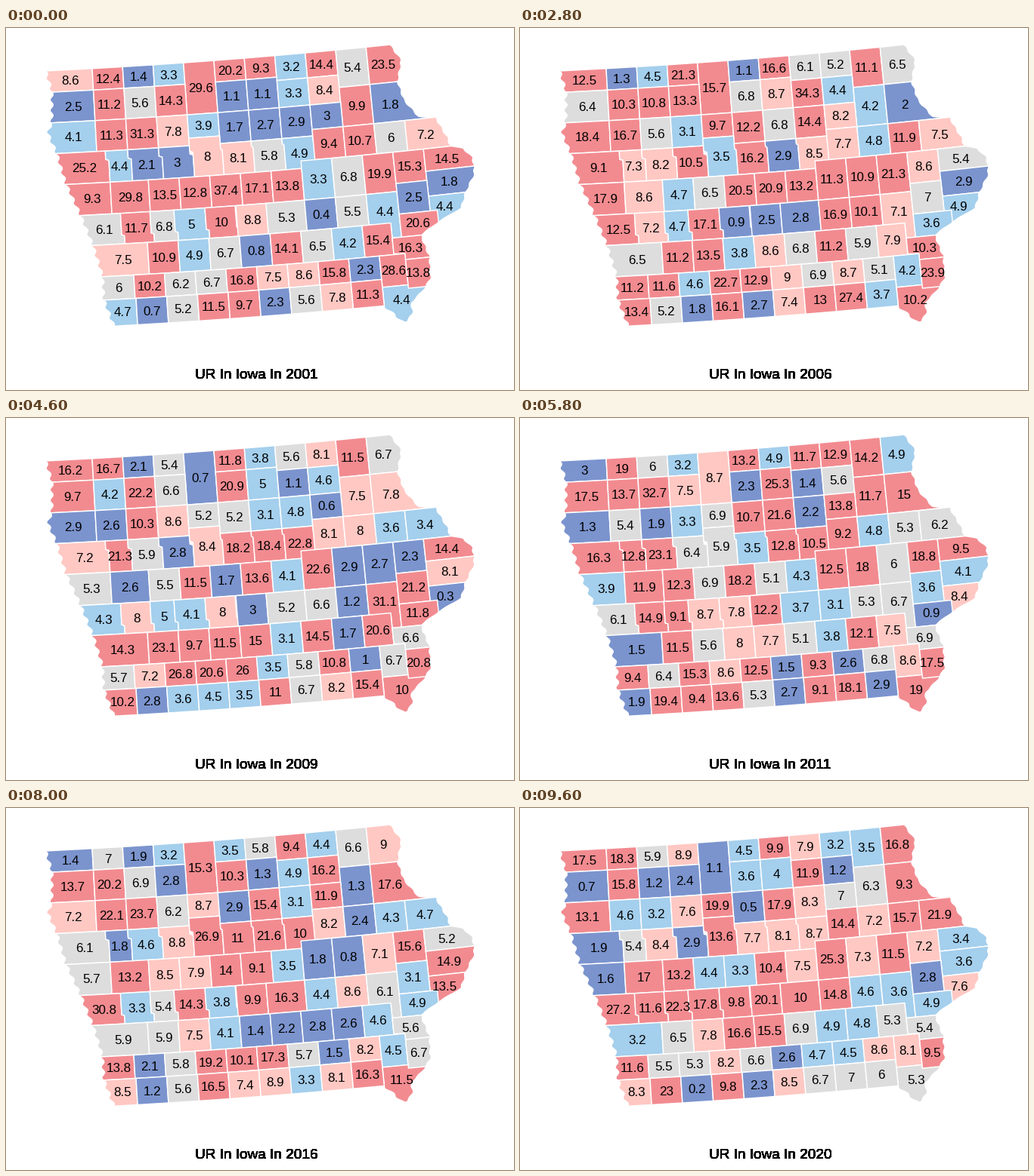
Animation, 672 px wide and 480 px high, one loop 10 s. Source, as a matplotlib script:

```python
import numpy as np
import matplotlib.pyplot as plt
from matplotlib.animation import FuncAnimation
from matplotlib.patches import Polygon

W, H, DPI = 672, 480, 100
TICK = 200
FIRST_YEAR = 2001
HOLDS = [2] + [3] * 10 + [2] * 9      # ticks each year stays on screen
YEAR_AT = np.repeat(np.arange(len(HOLDS)), HOLDS)

LIMITS = [3, 5, 7, 9]
COLORS = ["#7b94ce", "#a4cfed", "#dddddd", "#ffc8c3", "#f28b90"]
FONT = "Liberation Sans"
WEST, EAST = -np.inf, np.inf

# River borders as (depth, u) key points, roughened with a ripple
WEST_BANK = np.array([(0, 52), (27, 59), (67, 57), (83, 51), (109, 61), (150, 71),
                      (193, 88), (234, 102), (275, 112), (307, 112), (342, 123),
                      (343, 466), (366, 488)])
EAST_BANK = np.array([(0, 508), (22, 521), (49, 513), (75, 519), (99, 536),
                      (101.5, 557), (131, 570), (141.5, 572), (146, 588),
                      (160, 599), (181, 599), (204, 585), (224, 577), (239, 546),
                      (254, 522), (284, 530), (313, 528), (328, 516), (341, 501),
                      (356, 501), (366, 492)])


def bank(keys, v, ripple):
    return np.interp(v, *keys.T) + ripple * np.sin(0.45 * v)


def project(u, v):
    """Conic-like map: u is x along the top edge, v the depth below it."""
    d = u - 52
    x = u + (0.0415 + 0.000125 * u) * v
    y = 57 + v - 0.048 * d - 0.0000625 * d * d
    return np.column_stack([x, y])


def centroid(points):
    x, y = points.T
    x2, y2 = np.roll(points, -1, axis=0).T
    cross = x * y2 - x2 * y
    return np.array([((x + x2) * cross).sum(), ((y + y2) * cross).sum()]) / (3 * cross.sum())


regions = []


def cell(left, right, top, bottom, jog=EAST):
    """left and right are (above, below) positions around the depth `jog`."""
    v = np.linspace(top, bottom, 31)
    left, right = (np.where(v < jog, *side) for side in (left, right))
    left = np.maximum(left, bank(WEST_BANK, v, 2))
    right = np.minimum(right, bank(EAST_BANK, v, 1))
    regions.append(np.vstack([project(left, v), project(right, v)[::-1]]))


def strip(top, bottom, edges, shift=0, jog=EAST):
    for a, b in zip(edges, edges[1:]):
        cell((a, a + shift), (b, b + shift), top, bottom, jog)


def steps(start, pitch, count):
    return start + pitch * np.arange(count + 1)


north = steps(114, 40.25, 10)
middle = steps(178.6, 39.8, 9)

strip(0, 28.5, [WEST, *north[:4]])
strip(0, 69, north[3:5])
strip(0, 28.5, north[4:7])
strip(0, 33, north[6:9])
strip(0, 49.5, [*north[8:10], EAST])

strip(28.5, 69, [WEST, *north[:4]])
strip(28.5, 69, north[4:7])
strip(33, 69, north[6:9])
strip(49.5, 101.5, [*north[8:10], EAST])

strip(69, 110, [WEST, *north[:4]])
strip(69, 100, north[3:5])
strip(69, 110, north[4:8])
strip(69, 101.5, north[7:9])

strip(110, 151.5, [WEST, 125, *north[1:4]], shift=4, jog=122)
cell((north[3], north[3] + 4), (north[4], north[4] + 2), 100, 151.5, jog=118)
strip(110, 151.5, north[4:8], shift=2, jog=118)
strip(101.5, 141.5, [*north[7:11], EAST])

strip(151.5, 193.5, [WEST, 129, *middle[:6]])
strip(141.5, 193.5, middle[5:9])
strip(141.5, 183, middle[8:10])
for top, bottom in [(141.5, 171), (171, 204), (204, 240)]:
    strip(top, bottom, [middle[9], EAST])

strip(193.5, 234, [WEST, 140, 178, 209, 249, 288], shift=3.5, jog=222)
strip(193.5, 234, [289, 328, *middle[5:8]])
cell((middle[7], 485), (middle[8], middle[8]), 193.5, 254, jog=234)
strip(183, 223.5, middle[8:10])
strip(223.5, 254, [middle[8], 546])

strip(234, 276, [WEST, *steps(172.3, 39.4, 7), 485])
cell((485, 499), (EAST, EAST), 254, 284, jog=276)

strip(276, 307, [WEST, *steps(152.3, 39.25, 8)])
strip(276, 317.5, [466.3, 499])
strip(317.5, 366, [466.3, EAST])
strip(284, 322, [499, EAST])
strip(307, 342, [WEST, *steps(153.4, 39.1, 8)])


def rates(year):
    rng = np.random.default_rng(year)
    return np.maximum(rng.gamma(1.9, 4.7, len(regions)).round(1), 0.1)


RATES = [rates(FIRST_YEAR + i) for i in range(len(HOLDS))]

fig = plt.figure(figsize=(W / DPI, H / DPI), dpi=DPI, facecolor="white")
ax = fig.add_axes([0, 0, 1, 1])
ax.set_xlim(0, W)
ax.set_ylim(H, 0)
ax.axis("off")


def text(x, y, px):
    return ax.text(x, y, "", fontsize=px * 72 / DPI, family=FONT, color="black",
                   ha="center", va="baseline")


shapes = [ax.add_patch(Polygon(outline, ec="white", lw=1.05, joinstyle="round"))
          for outline in regions]
labels = [text(x, y + 6, 17) for x, y in map(centroid, regions)]
# Stacked copies harden the antialiased edges of the caption
captions = [text(331, 465, 19) for _ in range(20)]


def update(frame):
    index = YEAR_AT[frame]
    for shape, label, rate in zip(shapes, labels, RATES[index]):
        shape.set_facecolor(COLORS[np.searchsorted(LIMITS, rate)])
        label.set_text(f"{rate:g}")
    for caption in captions:
        caption.set_text(f"UR In Iowa In {FIRST_YEAR + index}")
    return shapes + labels + captions


anim = FuncAnimation(fig, update, frames=len(YEAR_AT), interval=TICK,
                     repeat=True, repeat_delay=0)
plt.show()
```
